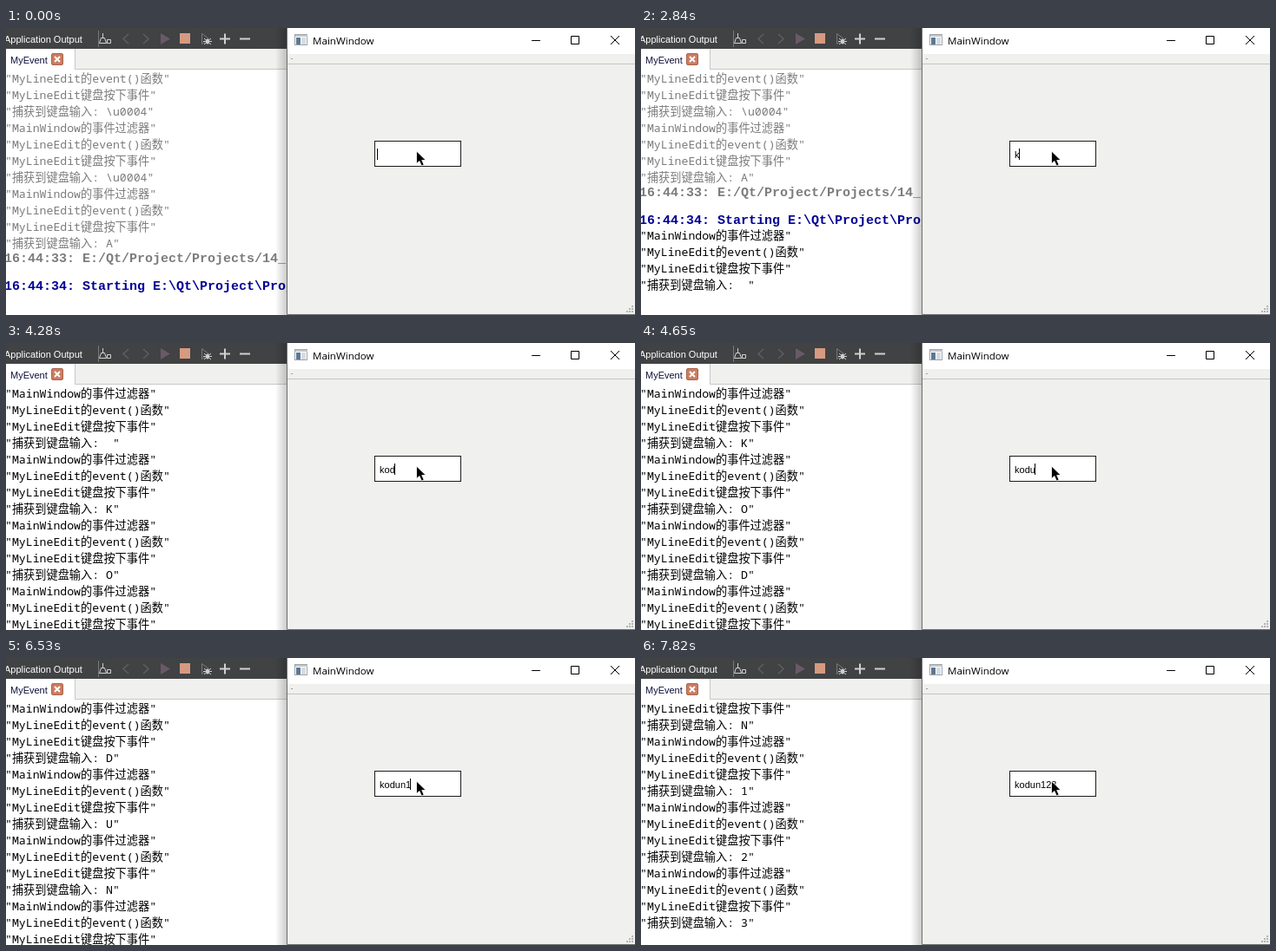
Write an HTML page that moves like this. It is 724 by 331 pixels and loops after 8 s.

```html
<!DOCTYPE html>
<html lang="zh-CN">
<head>
<meta charset="utf-8">
<title>Key event log</title>
<style>
html, body { margin: 0; width: 100%; height: 100%; overflow: hidden; background: #fff; }
svg { display: block; }
text { font: 11px "Liberation Sans", sans-serif; white-space: pre; }
#log text { font: 13.2px "Noto Sans Mono", "Noto Sans CJK SC", "Noto Sans CJK", monospace; }
#log .bold { font: bold 15px "Liberation Mono", monospace; }
.old { fill: #7c7c7c; }
.start { fill: #000096; }
.line { fill: none; stroke: #d0d0d0; }
</style>
</head>
<body>
<svg width="724" height="331" viewBox="0 0 724 331">
  <clipPath id="pane"><rect y="48" width="323" height="283"/></clipPath>
  <linearGradient id="shade">
    <stop offset="0" stop-opacity="0"/>
    <stop offset="1" stop-opacity=".2"/>
  </linearGradient>
  <g clip-path="url(#pane)"><g id="log"></g></g>

  <!-- output pane toolbar and tab -->
  <rect width="323" height="24" fill="#404244"/>
  <text x="-2" y="17" fill="#fff">Application Output</text>
  <g class="line">
    <path d="M106.500 3v19" stroke="#77797a"/>
    <path d="M111.500 6v5M109.500 11.500h4l2 6h-8zM116.500 13.500h4v4h-4z"/>
    <path d="M141 7l-6 5.500 6 5.500M158 7l6 5.500-6 5.500" stroke="#5c5e60" stroke-width="1.5"/>
    <path d="M246 12.500h12M252 6.500v12M269 12.500h12" stroke-width="2"/>
    <path d="M225.500 6.500v12l8-6z" stroke="#77797a"/>
    <path d="M228 12l8 7M236 12l-8 7M227 15.500h10"/>
  </g>
  <path d="M178 6v13l11-6.500z" fill="#6a5967"/>
  <rect x="200" y="6" width="12" height="12" fill="#d69a80"/>
  <ellipse cx="232" cy="15.500" rx="2" ry="3" fill="#d0d0d0"/>
  <rect y="24" width="323" height="24" fill="#f0f0ee"/>
  <rect y="47" width="323" height="1" fill="#c8c8c8"/>
  <rect y="24" width="79" height="24" fill="#fff"/>
  <rect x="79" y="24" width="1" height="24" fill="#c8c8c8"/>
  <text x="5" y="41" fill="#10103c">MyEvent</text>
  <rect x="52.500" y="29.500" width="13" height="13" rx="1.500" fill="#cb7d61" stroke="#a9644d"/>
  <path d="M56 33l6 6M62 33l-6 6" stroke="#fff" stroke-width="2"/>
  <rect x="310" width="13" height="331" fill="url(#shade)"/>

  <!-- application window -->
  <rect x="323" width="401" height="331" fill="#f0f0ee"/>
  <rect x="324" width="400" height="30" fill="#fff"/>
  <rect x="324" y="41" width="400" height="1" fill="#c4c4c4"/>
  <path d="M323.500 0v330.500h400.500" fill="none" stroke="#707070"/>
  <rect x="328" y="35" width="2" height="1" fill="#999"/>
  <rect x="332.500" y="7.500" width="14" height="12" fill="#fff" stroke="#a0a4a8"/>
  <rect x="333" y="8" width="14" height="2" fill="#c4c8cc"/>
  <rect x="334" y="11" width="5" height="8" fill="#5c7894"/>
  <rect x="340" y="11" width="5" height="8" fill="#d5dce2"/>
  <text x="353" y="19" style="font: 11.600px 'Open Sans', sans-serif">MainWindow</text>
  <path d="M605 14.500h10M650.500 9.500h9v9h-9zM696 9l10 10M706 9l-10 10" fill="none" stroke="#000"/>
  <path d="M720 321h2M717 324h2M720 324h2M714 327h2M717 327h2M720 327h2" stroke="#b4b4b4" stroke-width="2"/>

  <rect x="424.500" y="130.500" width="99" height="29" fill="#fff" stroke="#1c1c1c"/>
  <text id="input" x="427" y="150"></text>
  <rect id="caret" y="139" width="1" height="13"/>
  <path d="M472.500 142v14.500l3.400-3 2.400 5.500 2.800-1.200-2.400-5.300h4.500z" stroke="#fff" stroke-width=".8"/>
</svg>
<script>
const LOOP = 8000;
const TYPED = " kodun123";
const PRESSES = [1150, 2840, 3720, 4260, 4630, 4850, 6510, 6770, 7200];
const BLINK = 530, BLINK_DELAY = 90;
const ROW = 19, FIRST_ROW_Y = 58, VIEW = 250;
const LOG_INTERVAL = 10;

// the leading space is echoed one blink later; a press before the loop sets the first phase
const ECHOES = PRESSES.map((t, i) => i ? t : t + BLINK);
const RESETS = [-390, PRESSES[0], ...ECHOES];

const byId = id => document.getElementById(id);
const log = byId("log"), input = byId("input"), caret = byId("caret");
const rows = [];

function addLine(text, y, cls = "", x = -1) {
  const el = document.createElementNS("http://www.w3.org/2000/svg", "text");
  el.setAttribute("x", x);
  el.setAttribute("y", y + 5);
  el.setAttribute("class", cls);
  el.textContent = text;
  log.append(el);
  rows.push(y);
  return el;
}

const keyLines = key => [
  '"MainWindow的事件过滤器"',
  '"MyLineEdit的event()函数"',
  '"MyLineEdit键盘按下事件"',
  `"捕获到键盘输入: ${key}"`
];

const earlier = ["\\u0004", "\\u0004", "A"].flatMap(keyLines);
earlier.forEach((s, i) => addLine(s, -49 - ROW * (earlier.length - 1 - i), "old"));
addLine("16:44:33: E:/Qt/Project/Projects/14_l", -32, "bold old", -2);
addLine("", -14);
addLine("16:44:34: Starting E:\\Qt\\Project\\Proj", 0, "bold start", -2);
const fresh = [...TYPED.toUpperCase()].flatMap(keyLines)
  .map((s, i) => addLine(s, 18 + ROW * i));

const show = (el, on) => el.setAttribute("visibility", on ? "visible" : "hidden");

function drawInput(t) {
  const count = ECHOES.filter(e => e <= t).length;
  const idle = t - RESETS.findLast(r => r <= t) - BLINK_DELAY;
  input.textContent = TYPED.slice(0, count);
  caret.setAttribute("x", Math.max(427, 423 + 6 * count));
  show(caret, idle < 0 || Math.floor(idle / BLINK) % 2 === 0);
}

function drawLog(t) {
  // each press logs four lines in quick succession
  const logged = PRESSES.reduce((sum, p) =>
    sum + Math.max(0, Math.min(4, Math.floor((t - p) / LOG_INTERVAL))), 0);
  // the view snaps to the earliest whole row that keeps the last line visible
  const lastY = ROW * logged - 1;
  const top = FIRST_ROW_Y - rows.find(y => y >= lastY - VIEW);
  log.setAttribute("transform", `translate(0 ${top})`);
  fresh.forEach((el, i) => show(el, i < 4 * Math.ceil(logged / 4)));
}

const start = performance.now();
function tick() {
  const t = (performance.now() - start) % LOOP;
  drawInput(t);
  drawLog(t);
  requestAnimationFrame(tick);
}
tick();
</script>
</body>
</html>
```
